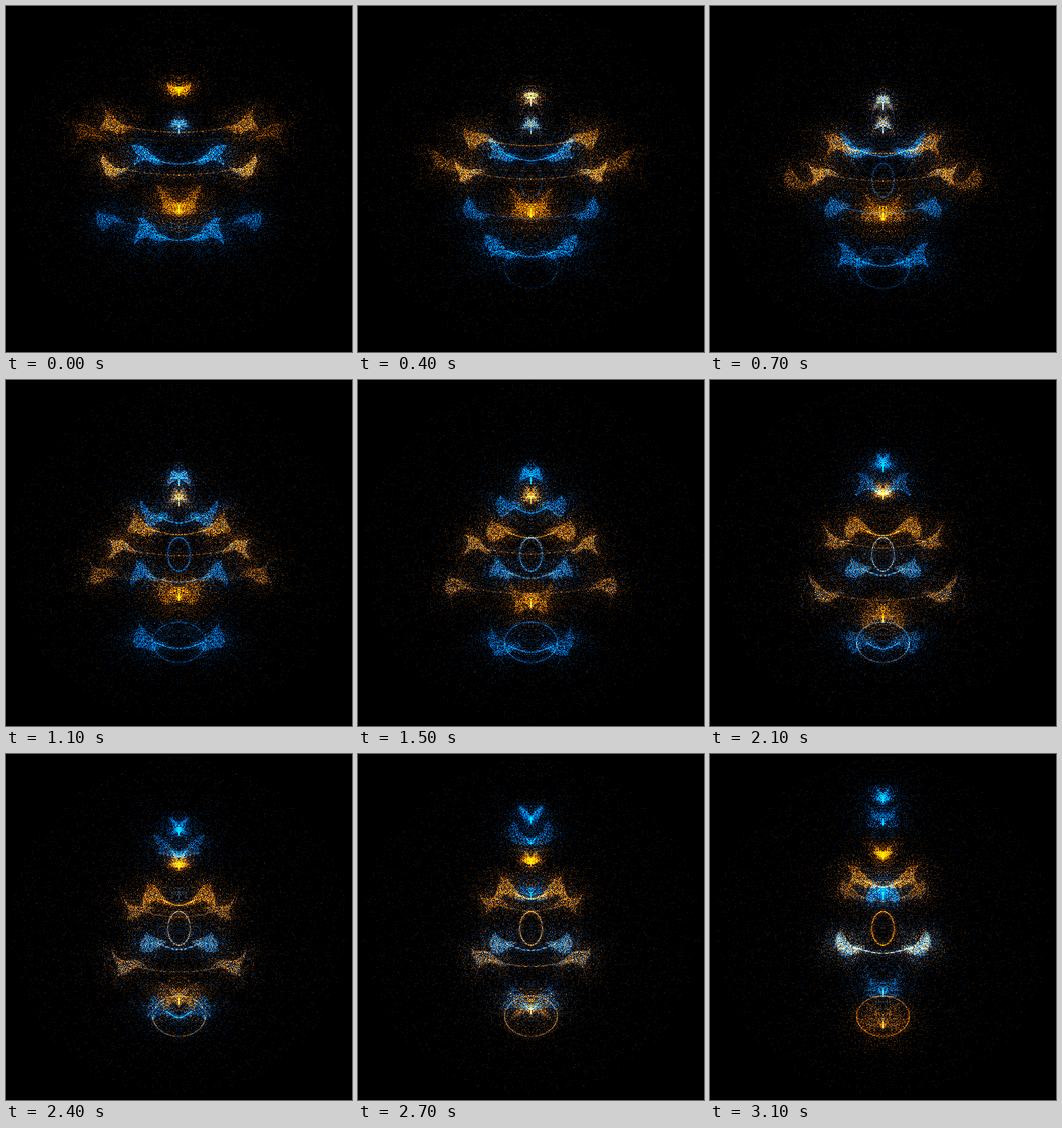
An HTML page with a canvas that plays this animation: 512x512 px, repeating every 3.2 s.

```html
<!DOCTYPE html>
<html lang="en">
<head>
<meta charset="utf-8">
<title>Mirrored particle flame</title>
<style>
  html, body { margin: 0; width: 100%; height: 100%; overflow: hidden; background: #000; }
  canvas { display: block; width: 100vw; height: 100vh; }
</style>
</head>
<body>
<canvas id="stage" width="512" height="512"></canvas>
<script>
const SIZE = 512, CENTER = 256, RADIUS = 250;
const LOOP = 3200, STEP = 100;
const LOBE_POINTS = 2600, THREAD_POINTS = 260, RING_POINTS = 700, HAZE_POINTS = 3000;

// Each lobe drifts from start through middle to end; x is the distance from the mirror axis.
// blue and weight run from their first value to their second over the loop.
const lobe = (size, start, middle, end, blue, weight = [1, 1]) =>
  ({ size, start, middle, end, blue, weight });

const lobes = [
  lobe(13, [0, 122], [0, 142], [0, 62], [0, 2.4], [.5, .35]),    // crown
  lobe(13, [0, 178], [0, 172], [0, 145], [.8, -.6], [.35, .45]), // neck
  lobe(22, [46, 224], [25, 185], [0, 95], [.95, 1], [1.1, .4]),  // brow
  lobe(23, [90, 177], [38, 224], [28, 187], [.1, .1]),           // wing
  lobe(19, [92, 240], [78, 247], [40, 208], [.2, .2], [1.1, .4]), // cheek
  lobe(28, [0, 296], [0, 328], [0, 395], [0, .1], [1.1, .6]),    // core
  lobe(22, [132, 190], [100, 308], [45, 285], [0, .4], [.3, 1]), // flank
  lobe(21, [98, 318], [36, 283], [45, 285], [1, .7], [.6, 1.1]), // shoulder
  lobe(25, [38, 337], [34, 393], [0, 346], [1, .95], [1.3, .5]), // base
  lobe(20, [0, 205], [0, 205], [0, 205], [1, 1], [-2.5, .8])     // heart
];

const rings = [
  { y: 258, rx: 17, ry: 25, blue: [1.7, 0] },
  { y: 388, rx: 39, ry: 30, blue: [1.9, 0] }
];

let seed = 20731;
function random() {
  seed = (Math.imul(seed, 1664525) + 1013904223) >>> 0;
  return seed / 4294967296;
}
const gauss = () => Math.sqrt(-2 * Math.log(random() + 1e-9)) * Math.cos(2 * Math.PI * random());
const lerp = ([a, b], p) => a + (b - a) * p;
const make = (count, build) => Array.from({ length: count }, build);

// Quadratic through three values at p = 0, 0.5 and 1.
const through = (a, b, c, p) =>
  a * (1 - p) * (1 - 2 * p) + b * 4 * p * (1 - p) + c * p * (2 * p - 1);

function makeLobePoint() {
  const kind = random();
  const spread = random() * 2 - 1;
  const point = {
    along: Math.sqrt(random()),
    across: random() < .5 ? Math.round(spread * 8) / 8 : spread,
    blurX: 0, blurY: 0, tailX: gauss() * .5, tailY: gauss() * .5,
    tint: random(), light: 65 + random() * 50
  };
  if (kind > .35) {
    point.blurX = gauss() * .8;
    point.blurY = gauss() * .65;
  }
  if (kind > .72) {
    const reach = 26 * Math.tan(random() * 1.5), angle = random() * 2 * Math.PI;
    point.tailX = reach * Math.cos(angle);
    point.tailY = reach * Math.sin(angle);
    point.light *= .7;
  }
  return point;
}

function makeLinePoint() {
  const blur = random() < .6 ? .4 : 3;
  return {
    along: random(), dx: gauss() * blur, dy: gauss() * blur,
    tint: random(), light: 50 + random() * 55
  };
}

for (const l of lobes) {
  l.points = make(Math.ceil(LOBE_POINTS * Math.max(...l.weight)), makeLobePoint);
  l.thread = make(THREAD_POINTS, makeLinePoint);
}
for (const ring of rings) ring.points = make(RING_POINTS, makeLinePoint);

const haze = make(HAZE_POINTS, () => {
  const reach = RADIUS * Math.pow(random(), .75), angle = (random() - .5) * Math.PI;
  return {
    x: reach * Math.cos(angle), y: CENTER + reach * Math.sin(angle),
    blue: random() < .5, light: 25 + random() * 45
  };
});

const ctx = document.getElementById("stage").getContext("2d");
const image = ctx.createImageData(SIZE, SIZE);
const pixels = image.data;

function addLight(x, y, blue, light) {
  const i = (y * SIZE + x) * 4;
  pixels[i + (blue ? 2 : 0)] += light;
  pixels[i + 1] += light * .5;
}

function plot(x, y, blue, light) {
  if (Math.hypot(x, y - CENTER) > RADIUS) return;
  const column = Math.floor(x), row = Math.floor(y);
  addLight(CENTER + column, row, blue, light);
  addLight(CENTER - 1 - column, row, blue, light);
}

// Shared folding of the plane, which gathers loose points into wisps.
function fold(x, y, phase) {
  const fx = x + 4.5 * Math.sin(y / 8 + phase);
  return [fx, y + 4.5 * Math.sin(fx / 8 - phase)];
}

function drawLobe({ size, start, middle, end, blue, weight, points, thread }, p, index) {
  const strength = lerp(weight, p), tint = lerp(blue, p);
  if (strength <= 0) return;
  const x = through(start[0], middle[0], end[0], p);
  const y = through(start[1], middle[1], end[1], p);
  const phase = index + 4 * p;

  for (const q of points.slice(0, strength * LOBE_POINTS)) {
    const flare = q.across * .65 * (.15 + Math.pow(q.along, 1.4));
    const [px, py] = fold(
      x + size * (2 * q.along - 1 + q.blurX),
      y + size * (.2 - .4 * q.along + flare + q.blurY), phase);
    plot(px + q.tailX, py + q.tailY, q.tint < tint, q.light);
  }
  // A thread runs from the lobe to the axis and meets its mirror image there.
  for (const q of thread) {
    const sag = 10 * Math.sin(q.along * Math.PI / 2);
    plot(x * (1 - q.along) + q.dx, y + sag + q.dy, q.tint < tint, q.light * Math.min(1, strength));
  }
}

function drawRing({ y, rx, ry, blue, points }, p) {
  const tint = lerp(blue, p), strength = Math.min(1, 2 * p);
  for (const q of points.slice(0, strength * RING_POINTS)) {
    const angle = (q.along - .5) * Math.PI;
    plot(rx * Math.cos(angle) + q.dx, y + ry * Math.sin(angle) + q.dy, q.tint < tint, q.light * .7);
  }
}

function draw(time) {
  const p = time / (LOOP - STEP);
  for (let i = 0; i < pixels.length; i += 4) {
    pixels[i] = pixels[i + 1] = pixels[i + 2] = 0;
    pixels[i + 3] = 255;
  }
  for (const h of haze) plot(h.x, h.y, h.blue, h.light);
  lobes.forEach((l, index) => drawLobe(l, p, index));
  for (const ring of rings) drawRing(ring, p);
  ctx.putImageData(image, 0, 0);
}

const begin = performance.now();
let shown = -1;
function tick() {
  const time = Math.floor((performance.now() - begin) % LOOP / STEP) * STEP;
  if (time !== shown) draw(shown = time);
  requestAnimationFrame(tick);
}
tick();
</script>
</body>
</html>
```
